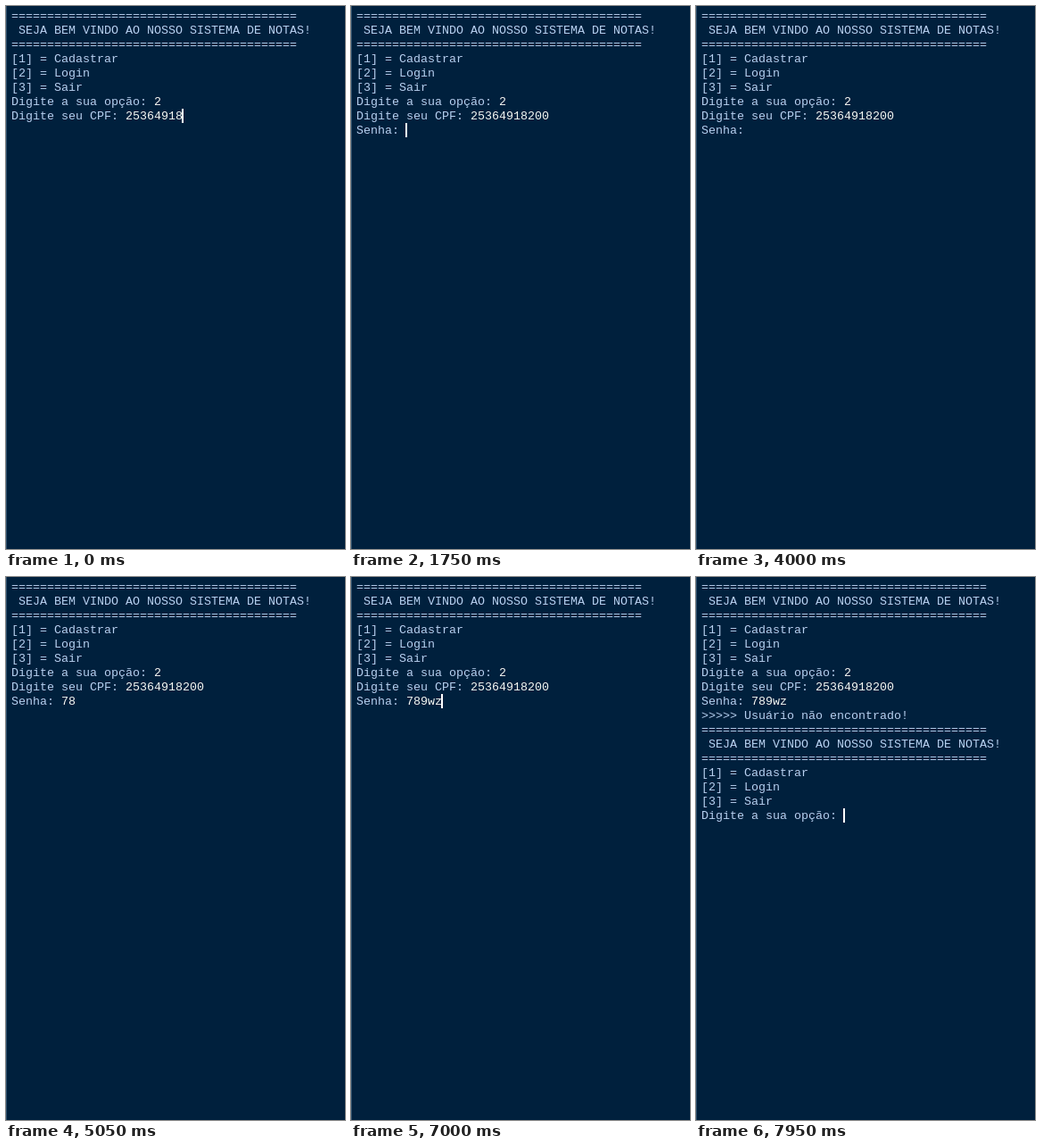
These frames come from a looping animation (380x608 px, 8 s). An HTML page:

```html
<!DOCTYPE html>
<html lang="pt-BR">
<head>
<meta charset="utf-8">
<title>Sistema de notas</title>
<style>
  html, body { margin: 0; width: 100%; height: 100%; overflow: hidden; background: #00203d; }
  #shell { position: relative; width: 380px; height: 608px; overflow: hidden; }
  #edge { position: absolute; left: 0; top: 0; width: 1px; height: 100%; background: #335470; }
  pre {
    position: absolute; left: 6px; top: 4px; margin: 0;
    font: 13.333px/16px "Liberation Mono", "Courier New", monospace;
    color: #b8d0f0;
  }
  b { font-weight: 400; color: #f6f6f2; }
  #caret { position: absolute; width: 2px; height: 16px; background: #fff; }
</style>
</head>
<body>
<div id="shell">
  <div id="edge"></div>
  <pre id="text"></pre>
  <div id="caret"></div>
</div>
<script>
const LOOP = 8000, CELL = 8, ROW = 16;
const CPF = "25364918200", PASSWORD = "789wz";
const CPF_KEYS = [500, 900, 1000];
const PASSWORD_KEYS = [4350, 4550, 5750, 6250, 6400];
const CPF_ENTER = 1650, PASSWORD_ENTER = 7050;

const textBox = document.getElementById("text");
const caret = document.getElementById("caret");

const rule = "=".repeat(40);
const menu = [
  rule, " SEJA BEM VINDO AO NOSSO SISTEMA DE NOTAS!", rule,
  "[1] = Cadastrar", "[2] = Login", "[3] = Sair", "Digite a sua opção: ",
].join("\n");

const pressed = (keys, t) => keys.filter(k => t >= k).length;
const input = s => `<b>${s}</b>`;

function screen(t) {
  const cpf = CPF.slice(0, CPF.length - CPF_KEYS.length + pressed(CPF_KEYS, t));
  let html = `${menu}${input(2)}\nDigite seu CPF: ${input(cpf)}`;
  if (t >= CPF_ENTER) {
    html += `\nSenha: ${input(PASSWORD.slice(0, pressed(PASSWORD_KEYS, t)))}`;
  }
  if (t >= PASSWORD_ENTER) html += `\n&gt;&gt;&gt;&gt;&gt; Usuário não encontrado!\n${menu}`;
  return html;
}

// The caret is lit for 600 ms and dark for 300 ms, independent of typing.
function caretLit(t) {
  const phase = t >= PASSWORD_ENTER ? 150 : 200;
  return (t + phase) % 900 < 600;
}

let shown = "";
function draw(t) {
  const html = screen(t);
  if (html !== shown) {
    textBox.innerHTML = shown = html;
    const lines = textBox.textContent.split("\n");
    caret.style.left = 5 + CELL * lines.at(-1).length + "px";
    caret.style.top = 3 + ROW * (lines.length - 1) + "px";
  }
  caret.style.visibility = caretLit(t) ? "visible" : "hidden";
}

const start = performance.now();
function tick() {
  draw((performance.now() - start) % LOOP);
  requestAnimationFrame(tick);
}
tick();
</script>
</body>
</html>
```
